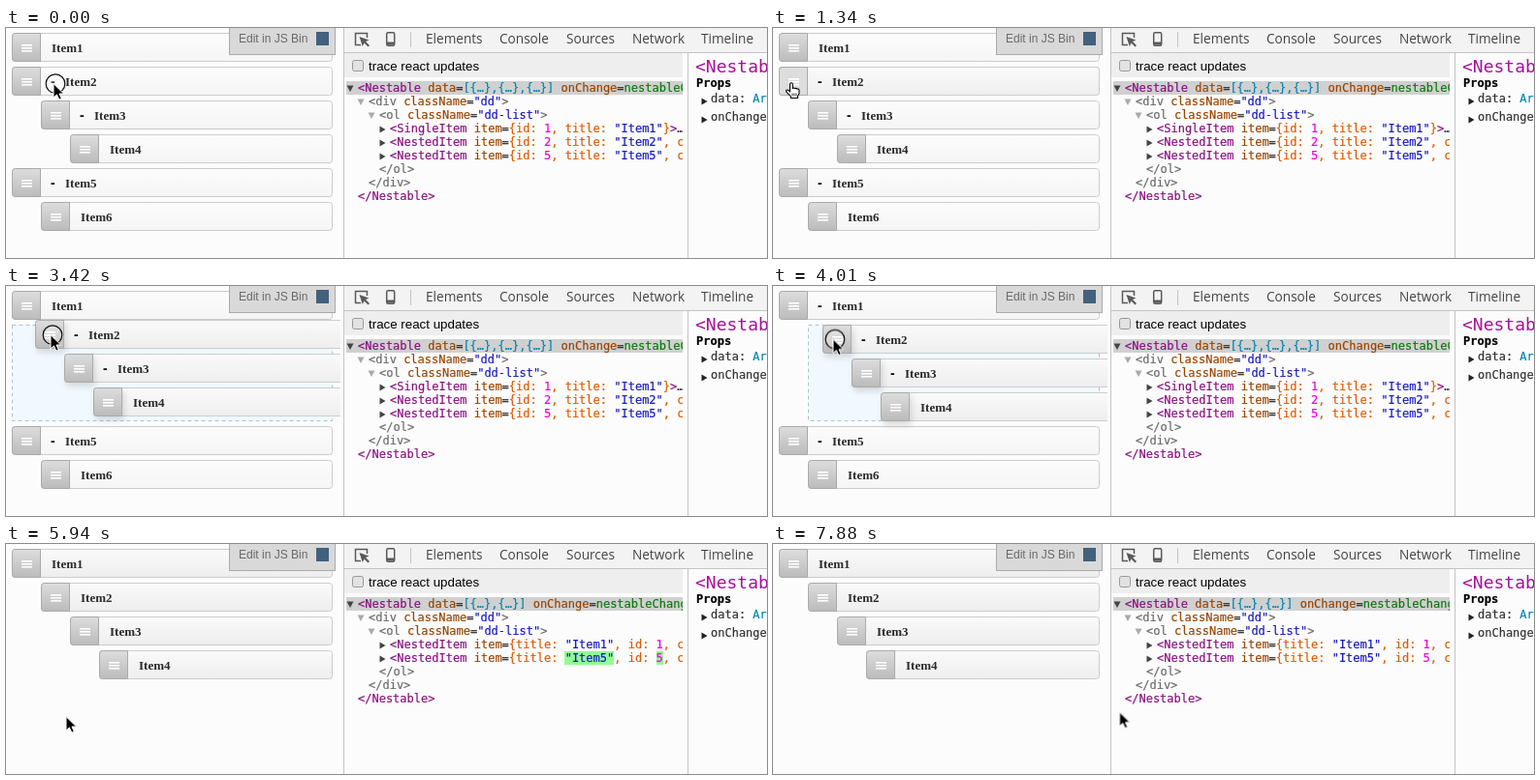
These frames come from a looping animation (785x238 px, 8000 ms). An HTML page:

```html
<!DOCTYPE html>
<html lang="en">
<head>
<meta charset="utf-8">
<title>Nestable list with component inspector</title>
<style>
html, body { margin: 0; width: 100%; height: 100%; overflow: hidden; background: #fcfcfc; }
svg { display: block; width: 785px; height: 238px; }
text { white-space: pre; }
text, tspan { fill: currentColor; }
.label { font: bold 13px "Liberation Serif", "Times New Roman", serif; color: #2a2a2a; }
.dash { font: bold 14px "Liberation Sans", Arial, sans-serif; color: #000; }
.edit { font: 12px "Liberation Sans", Arial, sans-serif; color: #6a6a6a; }
.tab { font: 13.6px "Open Sans", sans-serif; color: #444; }
.trace { font: 13.33px "Liberation Sans", Arial, sans-serif; color: #000; }
.code { font: 12px "DejaVu Sans Mono", monospace; color: #333; }
.code, .code tspan { stroke: currentColor; stroke-width: .2px; }
.head { font: 18px "DejaVu Sans Mono", monospace; }
.bold { font-weight: bold; color: #000; }
.tag { color: #881280; }
.head.tag { color: #a8109c; }
.dom { color: #6c6c6c; }
.attr { color: #994500; }
.key { color: #e05a00; }
.num { color: #f000e0; }
.str { color: #1a1ac0; }
.obj { color: #0086b3; }
.fn { color: #0b7a0b; }
.lift .handle { filter: drop-shadow(2px 4px 3px rgba(0, 0, 0, .13)); }
.flash { fill: #0f0; animation: flash 8s linear infinite; }
@keyframes flash {
  0%, 64.99% { opacity: 0; }
  65% { opacity: 1; animation-timing-function: steps(7); }
  78%, 100% { opacity: 0; }
}
</style>
</head>
<body>
<svg id="stage" viewBox="0 0 785 238" xmlns="http://www.w3.org/2000/svg"></svg>
<script>
const LOOP = 8000;
let css = '';

// Hard-cut keyframes: each entry is [ms, declarations].
function cuts(name, list) {
  css += `@keyframes ${name}{` +
    list.map(([ms, rule]) => `${ms / LOOP * 100}%{${rule}}`).join('') + '}' +
    `#${name}{animation:${name} ${LOOP}ms step-end infinite}`;
}

// Visible during each from/to pair.
const show = (name, ...times) => {
  const list = times[0] > 0 ? [[0, 'visibility:hidden']] : [];
  times.forEach((ms, i) => {
    if (ms < LOOP) list.push([ms, `visibility:${i % 2 ? 'hidden' : 'visible'}`]);
  });
  cuts(name, list);
};

const move = (name, list) =>
  cuts(name, list.map(([ms, x, y]) => [ms, `transform:translate(${x}px,${y}px)`]));

const esc = s => s.replace(/&/g, '&amp;').replace(/</g, '&lt;');
const text = (cls, x, y, s) => `<text class="${cls}" x="${x}" y="${y}">${esc(s)}</text>`;
const rect = (x, y, w, h, attrs) => `<rect x="${x}" y="${y}" width="${w}" height="${h}" ${attrs}/>`;
const group = (id, body, cls = '') => `<g id="${id}" class="${cls}">${body}</g>`;

const handle = (x, y, fill = 'url(#grip)') => '<g class="handle">' +
  `<path d="M${x + 29.5} ${y + .5}h-26a3 3 0 0 0-3 3v23a3 3 0 0 0 3 3h26z" fill="${fill}" stroke="#aaa"/>` +
  [12, 15, 18].map(v => rect(x + 10, y + v, 11, 1.6, 'fill="#fff"')).join('') + '</g>';

function row(x, y, name, dash, fill = 'flat') {
  return rect(x + .5, y + .5, 336 - x, 29, `rx="3" fill="url(#${fill})" stroke="#ccc"`) +
    handle(x, y) +
    (dash ? text('dash', x + 40, y + 20, '-') : '') +
    text('label', x + (dash ? 55 : 41), y + 20, name);
}

const slot = (id, x) => group(id,
  rect(x + .5, 40.5, 336 - x, 99, 'fill="#f1f9ff" stroke="#a9c6d3" stroke-dasharray="4 3"'));

const code = (x, y, parts) => `<text class="code" x="${x}" y="${y}">` +
  parts.map(([cls, s]) => `<tspan class="${cls}">${esc(s)}</tspan>`).join('') + '</text>';

const open = (x, y, fill) => `<path d="M${x - 3.5} ${y - 2.5}h7l-3.5 6.5z" fill="${fill}"/>`;
const closed = (x, y, fill = '#444') => `<path d="M${x - 2.5} ${y - 3}v7l6-3.5z" fill="${fill}"/>`;

const root = (data, y = 66) => code(363, y, [['tag', '<Nestable '], ['attr', 'data'], ['', '='],
  ['obj', data], ['', ' '], ['attr', 'onChange'], ['', '='], ['fn', 'nestableChange']]);

// props: [key, value] pairs; values starting with a quote are strings
function item(y, name, props, tail) {
  const parts = [['tag', `<${name} `], ['attr', 'item'], ['', '='], ['key', '{']];
  props.forEach(([key, value], i) => {
    parts.push(['key', `${i ? ', ' : ''}${key}: `], [value[0] === '"' ? 'str' : 'num', value]);
  });
  return closed(388, y - 3.5) + code(396, y, parts.concat(tail));
}

const more = [['key', ', children']];
const byId = (y, name, n, tail) => item(y, name, [['id', n], ['title', `"Item${n}"`]], tail);
const byTitle = (y, n) => item(y, 'NestedItem', [['title', `"Item${n}"`], ['id', n]], more);

const closing = y => code(385, y, [['dom', '</ol>']]) +
  code(374, y + 14, [['dom', '</div>']]) + code(363, y + 28, [['tag', '</Nestable>']]);

const element = (x, y, name, cls) => open(x - 8, y - 4, '#aaa') +
  code(x, y, [['dom', `<${name} `], ['attr', 'className'], ['', '='], ['str', `"${cls}"`], ['dom', '>']]);

const gradient = (id, a, b) => `<linearGradient id="${id}" x2="0" y2="1">` +
  `<stop stop-color="${a}"/><stop offset="1" stop-color="${b}"/></linearGradient>`;

const defs = '<defs>' + gradient('flat', '#fcfcfc', '#f5f5f5') + gradient('shade', '#fafafa', '#eee') +
  gradient('grip', '#ddd', '#bbb') +
  '<clipPath id="page"><path d="M0 0h345v238h-345z"/></clipPath>' +
  '<clipPath id="tree"><path d="M349 51h349v187h-349z"/></clipPath></defs>';

const list = '<g clip-path="url(#page)">' +
  group('first', row(6, 5, 'Item1')) +
  group('parent', row(6, 5, 'Item1', true)) +
  group('tail', row(6, 145, 'Item5', true) + row(36, 180, 'Item6')) +
  group('rest', row(6, 40, 'Item2', true) + row(36, 75, 'Item3', true) + row(66, 110, 'Item4')) +
  group('hover', row(6, 40, 'Item2', true, 'shade') + handle(6, 40, '#ddd')) +
  slot('slotOut', 6) + slot('slotIn', 36) +
  group('drag', group('carry', row(6, 40, 'Item2', true, 'shade') +
    row(36, 75, 'Item3', true, 'shade') + row(66, 110, 'Item4', false, 'shade')), 'lift') +
  group('done', [1, 2, 3, 4].map(n =>
    row(30 * n - 24, 35 * n - 30, 'Item' + n, false, 'shade')).join('')) +
  group('dropped', handle(36, 40, '#ddd')) +
  '</g>' +
  rect(230.5, -1, 109, 28.5, 'fill="#d9d9d9" stroke="#aaa"') +
  text('edit', 240, 15, 'Edit in JS Bin') + rect(320, 4, 13, 14, 'fill="#41617c"');

const panel = rect(349, 0, 436, 25, 'fill="#f3f3f3"') + rect(349, 26, 349, 25, 'fill="#eee"') +
  '<path d="M348.5 0V238M349 25.5H785M703.5 26V238M417.5 4V20" stroke="#c4c4c4" fill="none"/>' +
  '<path d="M366 17.5h-5.5v-12h12v4.5" fill="none" stroke="#5a5a5a" stroke-width="1.5"/>' +
  '<path d="M364.5 9l10 3.5-3.5 1.6 4 4-1.5 1.5-4-4-1.7 3.500z" fill="#5a5a5a"/>' +
  rect(392.7, 4.7, 8, 13.5, 'rx="1.5" fill="none" stroke="#5a5a5a" stroke-width="1.5"') +
  '<path d="M393 14.5h8v3h-8z" fill="#5a5a5a"/>' +
  [['Elements', 433], ['Console', 509], ['Sources', 578], ['Network', 646], ['Timeline', 717]]
    .map(([s, x]) => text('tab', x, 16, s)).join('') +
  rect(357.5, 33.5, 11, 11, 'rx="2" fill="#e2e2e2" stroke="#999"') +
  text('trace', 374, 44, 'trace react updates');

const tree = '<g clip-path="url(#tree)">' + rect(351, 55, 347, 14, 'fill="#d0d0d0"') +
  open(355, 62, '#444') + element(374, 80, 'div', 'dd') + element(385, 94, 'ol', 'dd-list') +
  group('before', root('[{…},{…},{…}]') +
    byId(108, 'SingleItem', '1', [['key', '}'], ['tag', '>'], ['', '…']]) +
    byId(122, 'NestedItem', '2', more) + byId(136, 'NestedItem', '5', more) + closing(150)) +
  group('after', rect(576, 111, 51, 14, 'class="flash"') + rect(671, 111, 7, 14, 'class="flash"') +
    root('[{…},{…}]') + byTitle(108, '1') + byTitle(122, '5') + closing(136)) +
  '</g>';

const props = text('head tag', 711, 46, '<Nestable>') + text('code bold', 712, 61, 'Props') +
  closed(720, 75.5, '#222') + code(727, 77, [['', 'data: '], ['obj', 'Array[3]']]) +
  closed(720, 94.5, '#222') + code(727, 96, [['', 'onChange: ']]);

const pointer = group('pointer',
  group('ring', '<circle cx="2" cy=".7" r="9.8" fill="#fff" fill-opacity=".25" stroke="#111" stroke-width="1.2"/>') +
  group('arrow', '<path d="M0 .6V15.1L3.4 11.9 5.8 17.2 8.3 16.1 6 11H10.6Z" fill="#000" stroke="#fff" stroke-linejoin="round"/>') +
  group('hand', '<path d="M.5 9V1.200a1.400 1.400 0 0 1 2.800 0V5.500q1.300-1.200 2.500.2 1.300-.9 2.300.4 1.800-.5 1.900 1.400v3.300l-1.500 2.700v2H1.300v-1.800L-2.200 10.200q-2-2.100-.7-3 1-.6 2 .5z" fill="#fff" stroke="#000" stroke-width="1.1" stroke-linejoin="round"/><path d="M3 10.500v3M5 10.500v3M7 10.500v3" stroke="#000" stroke-width=".8"/>'));

show('first', 0, 3570);
show('parent', 3570, 5200);
show('tail', 0, 5200);
show('rest', 0, 2680);
show('hover', 1190, 2680);
show('slotOut', 2680, 3570);
show('slotIn', 3570, 5200);
show('drag', 2680, 5200);
show('done', 5200, LOOP);
show('dropped', 5200, 5350);
show('before', 0, 5200);
show('after', 5200, LOOP);
show('ring', 0, 150, 2530, 5200);
show('arrow', 0, 1190, 2530, 5200, 5350, LOOP);
show('hand', 1190, 2530, 5200, 5350);

move('carry', [[0, 0, 0], [3120, 4, -1], [3270, 14, -4], [3420, 24, -5],
  [3570, 33, -4], [3720, 39, -2], [3860, 43, -1], [4010, 45, 0]]);

move('pointer', [[0, 49, 57], [740, 45, 59], [890, 36, 60], [1040, 26, 59], [1190, 20, 58],
  [1340, 17, 57], [2530, 17, 55], [3120, 24, 54], [3270, 36, 51], [3420, 46, 50],
  [3570, 52, 51], [3720, 57, 53], [3860, 60, 54], [4010, 62, 54.5],
  [5200, 63, 57], [5350, 67, 76], [5500, 69, 102], [5650, 68, 130], [5790, 66, 155],
  [5940, 62, 178], [6090, 56, 199], [6240, 46, 212],
  [6390, 15, 197], [6540, 27, 175], [6690, 60, 166], [6840, 84.5, 174],
  [6990, 91, 190], [7140, 90, 205], [7290, 87, 212], [7740, 190, 196], [7880, 357.5, 173.5]]);

document.head.appendChild(document.createElement('style')).textContent = css;
document.getElementById('stage').innerHTML = defs + list + panel + tree + props + pointer;
</script>
</body>
</html>
```
